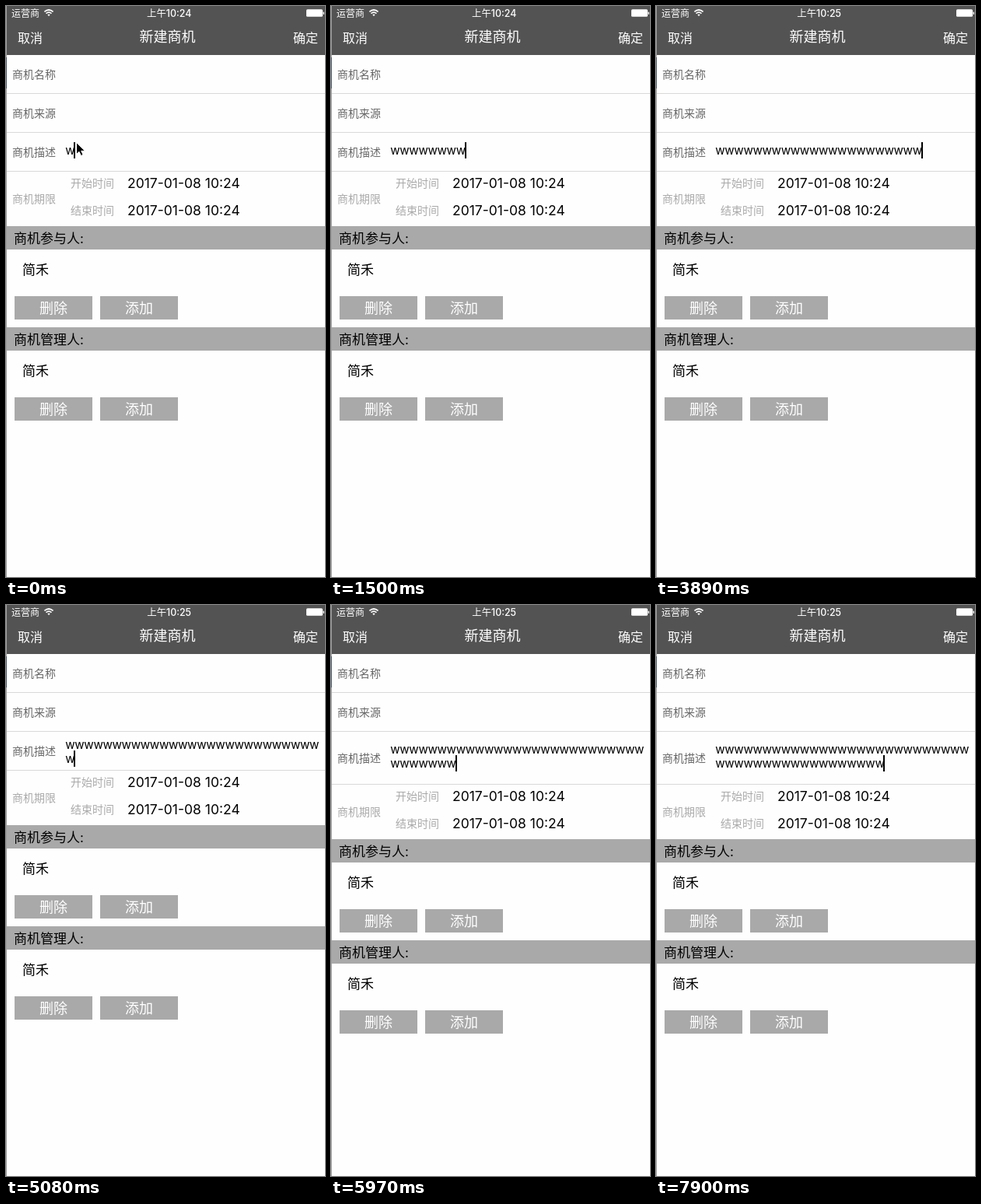
Write an HTML page that moves like this. It is 410 px wide and 734 px high and loops after 8 s.

```html
<!DOCTYPE html>
<html lang="zh-CN">
<head>
<meta charset="utf-8">
<title>新建商机</title>
<style>
  html, body { margin: 0; width: 100%; height: 100%; overflow: hidden; background: #fefefe; }
  svg { display: block; width: 410px; height: 734px; font-family: Inter, "Noto Sans CJK SC", "Noto Sans CJK", sans-serif; }
</style>
</head>
<body>
<svg id="stage" viewBox="0 0 410 734">
  <rect width="410" height="734" fill="#fefefe"/>
  <rect width="1" height="734" fill="#a0a0a0"/>
  <rect y="66" width="1" height="40" fill="#4a5a6a"/>
  <rect x="1" width="409" height="63" fill="#535353"/>
  <g fill="none" stroke="#fff" stroke-width="1.7">
    <path d="M49.4 7.4Q55 2.6 60.6 7.4M51.5 9.6Q55 6.8 58.5 9.6"/>
    <path d="M53.3 11L55 13.2L56.7 11Q55 9.8 53.3 11Z" fill="#fff" stroke="none"/>
  </g>
  <rect x="386" y="4.3" width="21" height="9.4" rx="1.5" fill="#fff"/>
  <rect x="407.6" y="7.5" width="1.4" height="3.5" rx=".7" fill="#fff"/>
  <g id="header"></g>
  <g id="fields"></g>
  <g id="lower"></g>
  <g id="typing"></g>
  <path id="pointer" d="M0 0V15L3.5 11.8L6 17L8.6 15.8L6.2 10.8H11Z" fill="#000" stroke="#fff" stroke-width="1"/>
</svg>
<script>
const LOOP = 8000;
const LEFT = 76.2, PITCH = 12.07, PER_LINE = 27, LINE_HEIGHT = 18;
const CLOCK_TICK = 3300, GROW_AT = 5230;
// Runs of key repeats: first time, last time, letters
const RUNS = [
  [300, 750, 4], [1050, 1200, 2], [1500, 2100, 5], [2400, 2550, 2],
  [2850, 3890, 8], [4040, 4040, 1], [4330, 4780, 4], [5080, 6120, 8],
  [6270, 6420, 2], [6720, 7460, 6], [7760, 7900, 2]
];

const $ = id => document.getElementById(id);

function add(parent, tag, attrs, content = '') {
  const node = document.createElementNS('http://www.w3.org/2000/svg', tag);
  for (const key in attrs) node.setAttribute(key, attrs[key]);
  node.textContent = content;
  parent.append(node);
  return node;
}

// Text placed by its vertical middle
function label(parent, content, x, middle, size, fill, anchor = 'start', weight = 400) {
  return add(parent, 'text', {
    x, y: middle + size * 0.37, 'font-size': size, fill,
    'text-anchor': anchor, 'font-weight': weight
  }, content);
}

const box = (parent, x, y, width, height, fill) =>
  add(parent, 'rect', { x, y, width, height, fill });

const shiftY = (node, y) => node.setAttribute('transform', `translate(0 ${y})`);

const header = $('header'), fields = $('fields'), lower = $('lower');
const typing = $('typing'), pointer = $('pointer');

label(header, '运营商', 7, 9.5, 12, '#fff');
const clock = label(header, '上午10:24', 209.7, 9.5, 12.4, '#fff', 'middle', 500);
label(header, '取消', 15, 41, 16, '#fff');
label(header, '新建商机', 207.5, 39, 18, '#fff', 'middle');
label(header, '确定', 401, 41, 16, '#fff', 'end');

label(fields, '商机名称', 8, 87.5, 14, '#666');
label(fields, '商机来源', 8, 137.5, 14, '#666');
const description = label(fields, '商机描述', 8, 187.5, 14, '#666');
[112, 162].forEach(y => box(fields, 1, y, 409, 1, '#d9d9d9'));

box(lower, 1, 212, 409, 1, '#d9d9d9');
label(lower, '商机期限', 8, 248, 14, '#aaa');
[['开始时间', 228], ['结束时间', 263]].forEach(([name, y]) => {
  label(lower, name, 83, y, 14, '#aaa');
  label(lower, '2017-01-08 10:24', 156, y, 17.5, '#000');
});
[['商机参与人:', 283], ['商机管理人:', 413]].forEach(([name, y]) => {
  box(lower, 1, y, 409, 30, '#a9a9a9');
  label(lower, name, 10, y + 15.5, 17, '#000');
  label(lower, '简禾', 21, y + 55.5, 17, '#000');
  [['删除', 11], ['添加', 121]].forEach(([action, x]) => {
    box(lower, x, y + 90, 100, 30, '#a9a9a9');
    label(lower, action, x + 50, y + 105, 18, '#fff', 'middle');
  });
});

const columns = Array.from({ length: PER_LINE }, (_, i) => (LEFT + i * PITCH).toFixed(2)).join(' ');
const lines = [0, 1].map(row => add(typing, 'text', {
  x: columns, y: 191 + row * LINE_HEIGHT, 'font-size': 15.2
}));
const caret = box(typing, 0, 0, 2, 21, '#000');

function lettersAt(time) {
  return RUNS.reduce((total, [first, last, count]) => {
    if (time < first) return total;
    const step = (last - first) / Math.max(1, count - 1) || 1;
    return total + Math.min(count, Math.floor((time - first) / step + 0.01) + 1);
  }, 1);
}

function draw(time) {
  const count = lettersAt(time);
  const row = count > PER_LINE ? 1 : 0;
  const grown = time >= GROW_AT;

  lines[0].textContent = 'w'.repeat(Math.min(count, PER_LINE));
  lines[1].textContent = 'w'.repeat(Math.max(0, count - PER_LINE));
  caret.setAttribute('x', Math.round(LEFT + (count - row * PER_LINE) * PITCH - 1));
  caret.setAttribute('y', 175 + row * LINE_HEIGHT);

  clock.textContent = time < CLOCK_TICK ? '上午10:24' : '上午10:25';
  // The second line scrolls into the field until the field has grown
  shiftY(typing, row && !grown ? -6 : 0);
  shiftY(description, grown ? 9 : 0);
  shiftY(lower, grown ? LINE_HEIGHT : 0);

  pointer.setAttribute('transform', time < 150 ? 'translate(90.5 175.5)' : 'translate(374.5 383.5)');
  pointer.style.display = time < 300 ? '' : 'none';
}

function frame() {
  draw(performance.now() % LOOP);
  requestAnimationFrame(frame);
}
frame();
</script>
</body>
</html>
```
